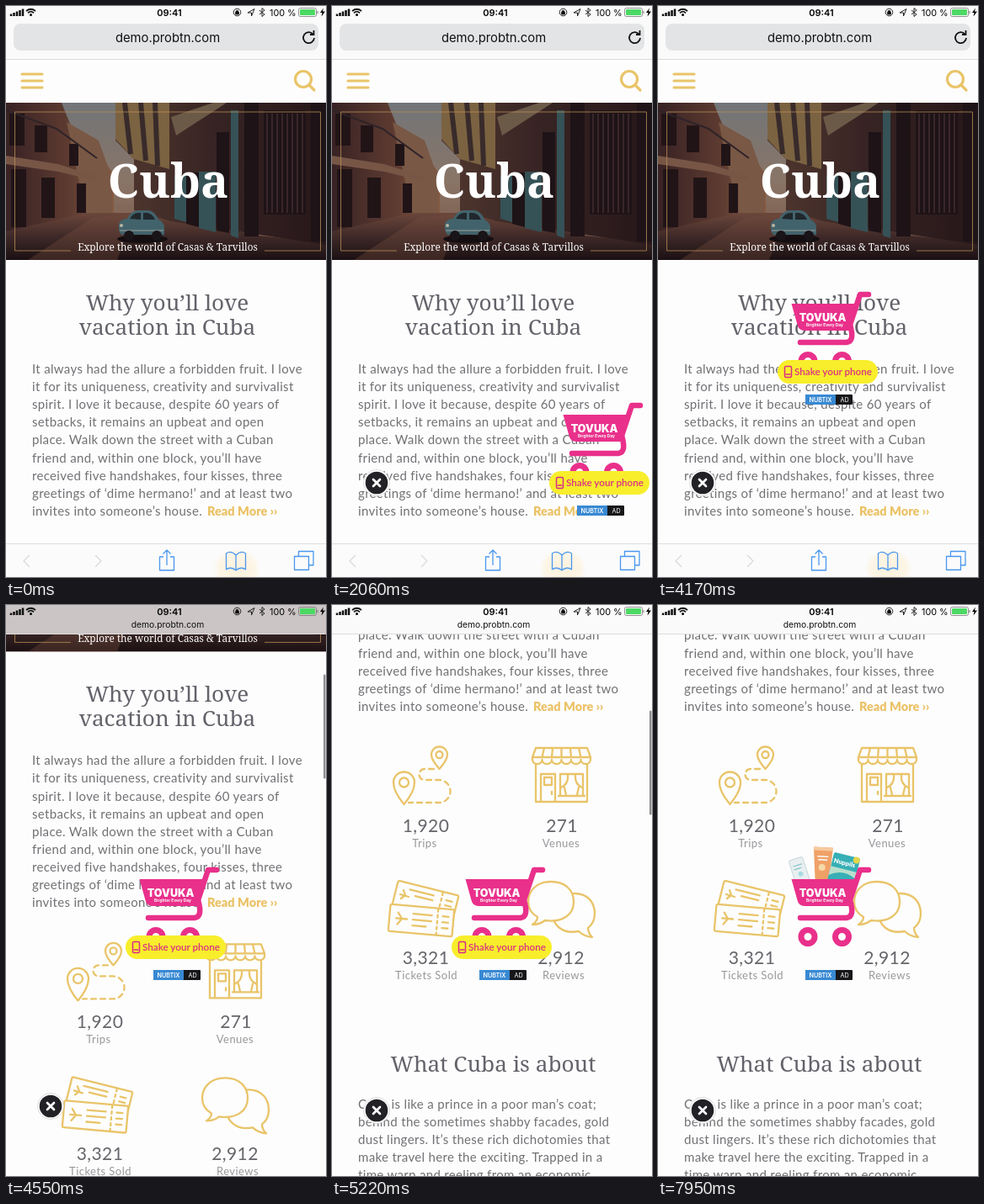
An HTML page that plays this animation: 380x679 px, repeating every 8 s.

```html
<!DOCTYPE html>
<html lang="en">
<head>
<meta charset="utf-8">
<title>Shake ad on a travel page</title>
<style>
html, body { margin: 0; width: 100%; height: 100%; overflow: hidden; background: #fdfdfd; }
svg { display: block; width: 100%; height: 100%; }
text { font-family: Lato, sans-serif; }
.ui { font-family: Inter, sans-serif; }
.serif { font-family: "Noto Serif", serif; }
.mid { text-anchor: middle; }
.title { font-size: 26.2px; fill: #63636b; }
.body { font-size: 15px; letter-spacing: .33px; fill: #717175; }
.more { font-size: 14.5px; font-weight: 900; fill: #ebc267; }
.count { font-size: 21px; letter-spacing: .4px; fill: #65656b; }
.label { font-size: 13px; letter-spacing: .45px; fill: #98989c; }
.gold { fill: none; stroke: #e9c469; stroke-width: 2.3; stroke-linejoin: round; stroke-linecap: round; }
.bold { stroke-width: 3.2; }
.blue { fill: none; stroke: #4a97ee; stroke-width: 1.3; stroke-linejoin: round; }
.grey { fill: none; stroke: #d8dadd; stroke-width: 1.3; }
.pink { fill: none; stroke: #e9308b; stroke-width: 7; stroke-linejoin: round; stroke-linecap: round; }
</style>
</head>
<body>
<svg viewBox="0 0 380 679" preserveAspectRatio="none">
  <defs>
    <linearGradient id="sky" x2="0" y2="1"><stop stop-color="#848a8d"/><stop offset=".5" stop-color="#a08a78"/><stop offset="1" stop-color="#8a5c48"/></linearGradient>
    <linearGradient id="road" x2="0" y2="1"><stop stop-color="#7d5344"/><stop offset=".5" stop-color="#47302d"/><stop offset="1" stop-color="#1d1214"/></linearGradient>
    <linearGradient id="left" x2="1" y2="0"><stop stop-color="#3f2728"/><stop offset=".6" stop-color="#6d4638"/><stop offset="1" stop-color="#9a6a4c"/></linearGradient>
    <linearGradient id="right" x2="1" y2="0"><stop stop-color="#5e4236"/><stop offset=".45" stop-color="#3f2a28"/><stop offset="1" stop-color="#2b1a1c"/></linearGradient>
    <radialGradient id="glow"><stop stop-color="#fbf1dc"/><stop offset=".75" stop-color="#fdf5e6"/><stop offset="1" stop-color="#fdf5e6" stop-opacity="0"/></radialGradient>
    <clipPath id="hero"><path d="M0 115H380V302H0Z"/></clipPath>
  </defs>
  <rect width="380" height="679" fill="#fdfdfd"/>

  <g id="page">
    <path class="gold bold" d="M19 81H43M19 89H43M19 97H43"/>
    <g class="gold bold"><circle cx="353" cy="87" r="9.5"/><path d="M360 94L366 100"/></g>
    <path d="M354 63.500H380" stroke="#ddd"/>

    <g clip-path="url(#hero)">
      <rect y="115" width="380" height="187" fill="url(#sky)"/>
      <path d="M0 115H66L80 150L112 178L128 200V250L0 282Z" fill="url(#left)"/>
      <path d="M72 138L110 160L126 205V248L96 252Z" fill="#8c6750"/>
      <path d="M0 268L96 246H172L300 273L380 281V302H0Z" fill="url(#road)"/>
      <path d="M130 115H380V284L196 256L152 243V182L130 160Z" fill="url(#right)"/>
      <path d="M130 115H194V194L152 182L130 158Z" fill="#8f744b"/>
      <path d="M141 115L148 176M160 115L166 184M177 115L180 190" stroke="#403231" stroke-width="6"/>
      <path d="M196 132L246 115H262L202 154Z" fill="#7d6a54"/>
      <g fill="#3c6065"><path d="M200 202H214V257L200 253ZM229 197H249V269L229 264ZM267 124H276V276L267 273Z"/></g>
      <g fill="#201519"><path d="M214 198H229V263L214 259ZM250 150H265V270L250 267ZM306 124H356V248H306ZM283 115H300V274H283ZM362 115H380V280H362Z"/></g>
      <path id="bars" stroke="#4b3538" stroke-width="1.5"/>
      <g fill="#241719"><path d="M4 128H22V166H4ZM6 194H24V263H6ZM34 142H49V174H34ZM42 204H58V252H42ZM75 164H86V190H75ZM84 211H95V246H84Z"/></g>
      <path d="M0 178L62 188L108 203V208L62 197L0 188Z" fill="#8a6551"/>
      <path d="M0 124L60 146L108 181" stroke="#34292d" stroke-width="2" fill="none"/>
      <path d="M104 251L152 248L132 302H26Z" fill="#8b5c48" opacity=".35"/>
      <ellipse cx="162" cy="277" rx="30" ry="5" fill="#150f12"/>
      <path d="M134 259Q136 253 144 253Q148 244 156 243H169Q177 244 181 254Q188 257 188 264V272H137Q133 268 134 259Z" fill="#4b757e"/>
      <path d="M147 253Q151 246 157 246H160V254ZM163 246H168Q174 247 177 254H163Z" fill="#222e33"/>
      <path d="M135 267H187" stroke="#94a6a5" stroke-width="1.500"/>
      <g fill="#1a1719"><circle cx="146" cy="273" r="6"/><circle cx="179" cy="273" r="6"/></g>
      <circle cx="137" cy="261" r="2" fill="#d8d2bb"/>
      <rect y="115" width="380" height="187" fill="#180b12" opacity=".16"/>
      <path d="M77 291H10.500V126H373.500V291H307" fill="none" stroke="#b58c55" opacity=".8"/>
      <text class="serif mid" x="192.500" y="228" font-size="55.5" font-weight="700" fill="#fff">Cuba</text>
      <text class="serif mid" x="192" y="291" font-size="11.8" fill="#fff">Explore the world of Casas &amp; Tarvillos</text>
    </g>

    <text class="serif title mid" x="191.500" y="362">Why you’ll love</text>
    <text class="serif title mid" x="191.500" y="391">vacation in Cuba</text>
    <g id="intro"></g>
    <text class="more" x="239" y="606">Read More ››</text>

    <g transform="translate(0 480)">
      <g class="gold">
        <path d="M85.500 237Q73 222 73 211A12.500 12.500 0 0 1 98 211Q98 222 85.500 237Z"/><circle cx="85.500" cy="211" r="5.500"/>
        <path d="M127.500 195Q118 184 118 178A9.500 9.500 0 0 1 137 178Q137 184 127.500 195Z"/><circle cx="127.500" cy="178" r="4"/>
        <path d="M121 195H110a6.500 6.500 0 0 0 0 13H127a13.500 13.500 0 0 1 0 27H91" stroke-dasharray="6 5"/>

        <path d="M242 170H303L307 181H238ZM238 181v3a5.750 5 0 0 0 11.500 0a5.750 5 0 0 0 11.500 0a5.750 5 0 0 0 11.500 0a5.750 5 0 0 0 11.500 0a5.750 5 0 0 0 11.500 0a5.750 5 0 0 0 11.500 0v-3M252 170L249.500 181M262 170L261 181M272.500 170V181M283 170L284 181M293 170L295.500 181"/>
        <path d="M242 190V234H303V190M248 234V201H265V234M252 205H261V214H252ZM261 222V225M271 201H298V227H271ZM269 227H300M280 202Q281 213 272 217M289 202Q288 213 297 217M276 217L278 226M293 217L291 226"/>

        <g transform="rotate(14 110 351)"><rect x="74" y="336" width="74" height="32" rx="2"/><path d="M129 337V367" stroke-dasharray="3 4"/><path d="M90 343H119M98 349H119M135 345H142M135 351H142M135 357H142"/></g>
        <g transform="rotate(5 106 375)"><rect x="68" y="359" width="76" height="32" rx="2" fill="#fdfdfd"/><path d="M125 360V390" stroke-dasharray="3 4"/><path d="M76 375H89M83 375L78 368M83 375L78 382M96 368H118M96 375H118M96 382H112M131 368H138M131 375H138M131 382H138"/></g>
        <path d="M81 344L91 347M87 345L85 339M87 345L82 349"/>

        <path d="M288 343C304 343 312 354 312 367Q312 378 304 384Q304 390 309 395Q299 394 293 388C272 392 262 379 262 367C262 354 272 343 288 343Z"/>
        <path fill="#fdfdfd" d="M260 329C277 329 287 339 287 353C287 368 274 378 253 375Q247 380 238 380Q244 376 244 371C237 367 233 361 233 353C233 339 244 329 260 329Z"/>
      </g>
      <g class="mid">
        <text class="count" x="111.500" y="270">1,920</text><text class="label" x="110" y="288">Trips</text>
        <text class="count" x="273" y="270">271</text><text class="label" x="272" y="288">Venues</text>
        <text class="count" x="111.500" y="427">3,321</text><text class="label" x="112" y="445">Tickets Sold</text>
        <text class="count" x="272" y="427">2,912</text><text class="label" x="275" y="445">Reviews</text>
      </g>
      <text class="serif title mid" x="191.500" y="555">What Cuba is about</text>
      <g id="about"></g>
    </g>
  </g>

  <g id="close">
    <circle r="15.500" fill="#fff" stroke="#ccc" stroke-width=".7"/><circle r="13.300" fill="#222126"/>
    <path d="M-4 -4L4 4M4 -4L-4 4" stroke="#fff" stroke-width="2.700" stroke-linecap="round"/>
  </g>

  <g id="ad">
    <g class="product">
      <g transform="rotate(-18 168 315)"><rect x="159" y="301" width="17" height="36" rx="2" fill="#e9eff0" stroke="#c6d7da"/><path d="M162 309H173M162 313H171" stroke="#70bcc5"/><circle cx="168" cy="320" r="3" fill="#a9dce0"/></g>
    </g>
    <g class="product">
      <g transform="rotate(3 195 306)"><path d="M184 288H207L204 331H188Z" fill="#f0a167"/><path d="M184 288H207V292H184Z" fill="#f7c99e"/><path d="M189 299H202M190 303H201" stroke="#fff" stroke-width="1.500"/><circle cx="195" cy="312" r="4" fill="#f8d9a8"/></g>
    </g>
    <g class="product">
      <g transform="rotate(14 220 313)"><rect x="205" y="297" width="32" height="34" rx="2" fill="#36afb5"/><path d="M205 314H237V322Q220 313 205 325Z" fill="#b9dfcd"/><circle cx="233" cy="300" r="4" fill="#e4d54b"/><text class="mid" x="220" y="309" font-size="7.500" font-weight="900" fill="#fff">Nuppils</text></g>
    </g>
    <path d="M158.500 326H236L229 358H174Q167 358 165.500 351Z" fill="#e9308b"/>
    <path class="pink" d="M250 315H240L228 351" style="stroke-width:6.500"/>
    <path class="pink" d="M228 351Q234 371 224 372H169" style="stroke-width:6.500"/>
    <g class="pink"><circle cx="178" cy="394.500" r="8"/><circle cx="218.500" cy="394.500" r="8"/></g>
    <text class="ui mid" x="195.500" y="347" font-size="12.500" font-weight="900" fill="#fff">TOVUKA</text>
    <text class="ui mid" x="198" y="352.500" font-size="4.800" font-weight="700" fill="#fff">Brighter Every Day</text>
    <g id="button">
      <rect x="-59.500" y="-14" width="119" height="28" rx="14" fill="#f8ee2b"/>
      <rect x="-51" y="-6.500" width="8" height="13" rx="1.500" fill="none" stroke="#d92d86" stroke-width="1.500"/><path d="M-50 3H-44" stroke="#d92d86" stroke-width="1.500"/>
      <text x="-39.500" y="4" font-size="11.700" font-weight="600" fill="#d92d86">Shake your phone</text>
    </g>
    <rect x="175" y="434" width="56" height="12" rx="1" fill="#17171a"/><rect x="175" y="434" width="36" height="12" rx="1" fill="#3889d3"/>
    <g class="mid" fill="#fff" font-size="7.200"><text class="ui" x="193" y="442.700" font-weight="600">NUBTIX</text><text class="ui" x="221.500" y="442.700">AD</text></g>
  </g>

  <rect id="scrollbar" x="377" width="2.500" height="124" rx="1.200" fill="#8c8c90"/>

  <g id="header">
    <rect id="headerBack" width="380" fill="#fafafa"/>
    <rect id="headerTint" width="380" height="35" fill="#38201f"/>
    <path id="headerLine" d="M0 0H380" stroke="#dcdcde"/>
    <g id="field"><rect x="9" y="21" width="362" height="32" rx="8" fill="#e3e4e6"/>
      <path d="M364.500 33.500A6.500 6.500 0 1 0 366 38M361 34H365.500V29" fill="none" stroke="#111" stroke-width="1.800"/></g>
    <text id="url" class="ui mid" fill="#111">demo.probtn.com</text>
    <path d="M6 9.500V12M9.500 8V12M13 6.500V12M16.500 5V12M20 3.500V12" stroke="#111" stroke-width="2.500"/>
    <path d="M24 6Q29.500 1.500 35 6M26 8.300Q29.500 5 33 8.300" fill="none" stroke="#111" stroke-width="1.700"/><circle cx="29.500" cy="10.500" r="1.500"/>
    <text class="ui mid" x="194" y="11.500" font-size="11" font-weight="600">09:41</text>
    <circle cx="274.500" cy="7.500" r="4.300" fill="none" stroke="#222"/><path d="M272.500 7H276.500V10H272.500ZM273.300 7V5.500H275.700V7" stroke="#222" stroke-width=".8"/>
    <path d="M287 8L295 3.500L291.500 12V8Z" fill="none" stroke="#222"/>
    <path d="M301 5L307 10L304 12.500V2.500L307 5L301 10" fill="none" stroke="#222"/>
    <text class="ui" x="313" y="11.500" font-size="10.800">100 %</text>
    <rect x="347.500" y="2.500" width="21" height="10" rx="2" fill="none" stroke="#777" stroke-width=".8"/><rect x="349" y="4" width="18" height="7" rx="1" fill="#4cd964"/><path d="M370 6V9" stroke="#777"/>
    <path d="M377 2.500L373 8H375.500L374.500 12.500L379 6.500H376Z"/>
  </g>

  <g id="toolbar">
    <rect y="640" width="380" height="39" fill="#fbfbfb"/><path d="M0 639.500H380" stroke="#dedede"/>
    <ellipse cx="274" cy="669" rx="28" ry="24" fill="url(#glow)"/>
    <path class="grey" d="M28 653L21 660L28 667M106 653L113 660L106 667"/>
    <path class="blue" d="M187 655H182.500V671H199.500V655H195M191 665V647M186.500 651.500L191 647L195.500 651.500"/>
    <path class="blue" d="M273 653Q267 647 261.500 651V670Q267 666 273 671Q279 666 284.500 670V651Q279 647 273 653V671"/>
    <path class="blue" d="M342.500 654.500H359.500V670.500H342.500ZM347.500 654V648.500H365V665H360"/>
  </g>
</svg>
<script>
const $ = id => document.getElementById(id);
const clamp = v => Math.min(1, Math.max(0, v));
const span = (t, from, to) => clamp((t - from) / (to - from));
const smooth = u => u * u * (3 - 2 * u);
const easeOut = u => 1 - (1 - u) ** 2;
const move = (el, x, y, extra = '') => el.setAttribute('transform', `translate(${x} ${y}) ${extra}`);

function paragraph(id, baseline, lines) {
  $(id).innerHTML = lines.map((line, i) =>
    `<text class="body" x="31" y="${baseline + i * 21.1}">${line}</text>`).join('');
}
paragraph('intro', 437, [
  'It always had the allure a forbidden fruit. I love',
  'it for its uniqueness, creativity and survivalist',
  'spirit. I love it because, despite 60 years of',
  'setbacks, it remains an upbeat and open',
  'place. Walk down the street with a Cuban',
  'friend and, within one block, you’ll have',
  'received five handshakes, four kisses, three',
  'greetings of ‘dime hermano!’ and at least two',
  'invites into someone’s house.']);
paragraph('about', 599, [
  'Cuba is like a prince in a poor man’s coat;',
  'behind the sometimes shabby facades, gold',
  'dust lingers. It’s these rich dichotomies that',
  'make travel here the exciting. Trapped in a',
  'time warp and reeling from an economic']);
$('bars').setAttribute('d', Array.from({ length: 8 }, (_, i) => `M${310 + i * 6} 128V246`).join(''));

// Ad position over time: [ms, x, y]
const path = [[500, 236, 160], [900, 116, 160], [2250, 116, 160], [2930, -9.5, 10.5], [3250, 4, 31], [3550, 0, 28]];
function adPosition(t) {
  const i = path.findIndex(key => key[0] > t);
  if (i === 0) return path[0].slice(1);
  if (i < 0) return path.at(-1).slice(1);
  const [a, b] = [path[i - 1], path[i]];
  const u = smooth(span(t, a[0], b[0]));
  return [a[1] + (b[1] - a[1]) * u, a[2] + (b[2] - a[2]) * u];
}
const wiggle = (t, start) => {
  const u = span(t, start, start + 640);
  return 10 * Math.sin(u * Math.PI * 5) * Math.sin(u * Math.PI);
};

// Products fly in one after another: [start ms, x offset, y offset, spin]
const flights = [[6900, -150, -130, -120], [7080, -10, -220, 90], [7260, 140, -140, 130]];
const products = document.querySelectorAll('.product');

function draw() {
  const t = performance.now() % 8000;
  const scroll = 480 * easeOut(span(t, 4291, 5150));
  const fold = clamp(scroll / 100);
  const shown = span(t, 500, 800);

  move($('page'), 0, -scroll);
  const headerHeight = 64 - 29 * fold;
  $('headerBack').setAttribute('height', headerHeight);
  // The photo shows through the folded header while it passes behind it
  $('headerTint').setAttribute('opacity', .24 * span(scroll, 60, 100) * clamp((302 - scroll) / 35));
  move($('headerLine'), 0, headerHeight - .5);
  $('field').setAttribute('opacity', clamp(1 - fold * 2));
  move($('field'), 0, -16 * fold);
  move($('url'), 192, 43 - 16 * fold);
  $('url').setAttribute('font-size', 14.8 - 4.5 * fold);
  move($('toolbar'), 0, 40 * fold);

  $('scrollbar').setAttribute('y', 37 + .1845 * scroll);
  $('scrollbar').setAttribute('opacity', span(t, 4291, 4360) * (1 - span(t, 5500, 5800)));

  move($('close'), 53, 567 + 29 * fold + 5 * span(t, 4550, 4900));
  $('close').setAttribute('opacity', shown);
  const [x, y] = adPosition(t);
  move($('ad'), x, y - 28 * fold);
  $('ad').setAttribute('opacity', shown);

  const leave = smooth(span(t, 6050, 6250));
  move($('button'), 201.5, 407, `rotate(${wiggle(t, 2610) + wiggle(t, 5350)}) scale(${1 - .3 * leave})`);
  $('button').setAttribute('opacity', 1 - leave);

  flights.forEach(([start, dx, dy, spin], i) => {
    const left = 1 - easeOut(span(t, start, start + 400));
    move(products[i], dx * left, dy * left, `rotate(${spin * left} 198 313)`);
    products[i].setAttribute('opacity', span(t, start, start + 80));
  });
  requestAnimationFrame(draw);
}
draw();
</script>
</body>
</html>
```
